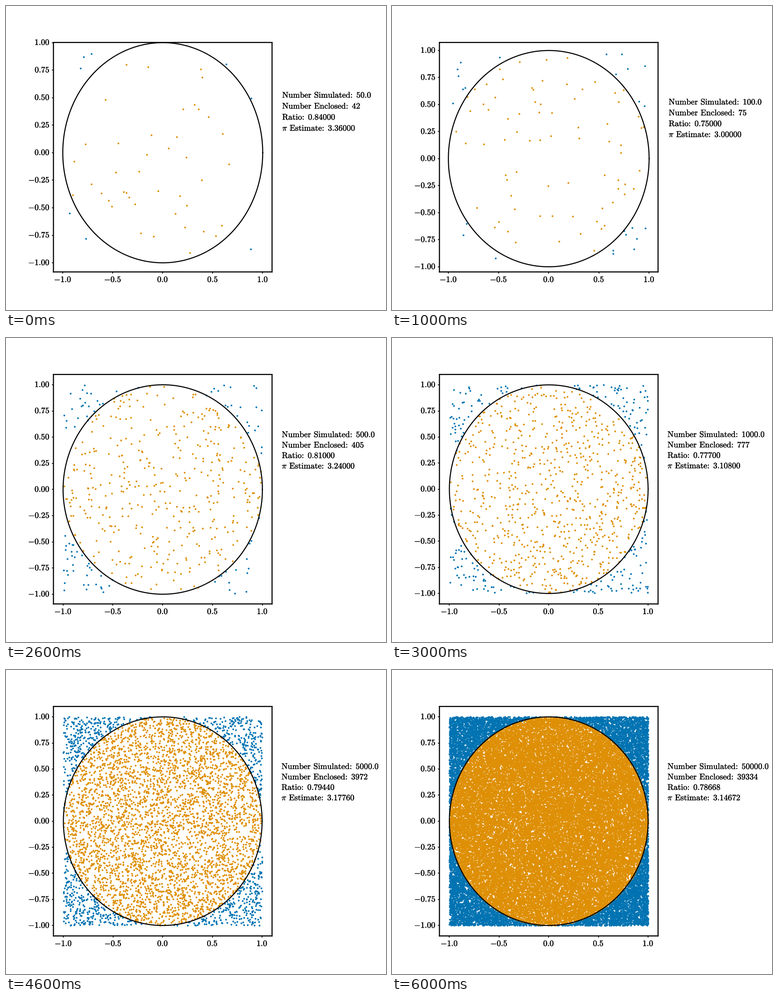
A matplotlib script that plays this animation: 837x669 px, repeating every 7000 ms.

```python
import numpy as np
import matplotlib
import matplotlib.pyplot as plt
from matplotlib import patheffects
from matplotlib.animation import FuncAnimation

matplotlib.rcParams["mathtext.fontset"] = "cm"

W, H, DPI = 837, 669, 64
PT = 72 / DPI  # points per pixel
LEFT, RIGHT, TOP, BOTTOM = 104.5, 586.0, 80.2, 585.2
BLUE, ORANGE = "#0173b2", "#de8f05"
MARGIN = 0.05

# simulated, enclosed, half width of the sample, its lowest and highest y
STAGES = [
    (50, 42, 0.994, -0.988, 0.907),
    (100, 75, 0.990, -0.951, 0.978),
    (500, 405, 0.997, -0.993, 0.999),
    (1000, 777, 1, -1, 1),
    (5000, 3972, 1, -1, 1),
    (10000, 7901, 1, -1, 1),
    (50000, 39334, 1, -1, 1),
]


def draw_sample(seed, n, enclosed, half, low, high):
    """Uniform points with a fixed number of them inside the circle."""
    rng = np.random.default_rng(seed)
    pts = rng.uniform((-half, low), (half, high), (3 * n, 2))
    inside = np.hypot(pts[:, 0], pts[:, 1]) < 1
    return pts[inside][:enclosed], pts[~inside][:n - enclosed]


def padded(low, high):
    pad = MARGIN * (high - low)
    return low - pad, high + pad


def roman(text):
    """Upright math text with word spaces; the colon's own padding is undone."""
    text = text.replace(": ", r"\hspace{-0.2}:\hspace{0.31}")
    return r"\mathrm{" + text.replace(" ", r"\hspace{0.38}") + "}"


def tick_labels(values, digits):
    return [f"${roman(f'{v:.{digits}f}')}$" for v in values]


samples = [draw_sample(40 + i, *stage) for i, stage in enumerate(STAGES)]

fig = plt.figure(figsize=(W / DPI, H / DPI), dpi=DPI, facecolor="white")
ax = fig.add_axes([LEFT / W, 1 - BOTTOM / H, (RIGHT - LEFT) / W, (BOTTOM - TOP) / H])
for spine in ax.spines.values():
    spine.set(linewidth=2.4 * PT, snap=False)

# a thin outline gives the letters their weight
ink = dict(size=18.2 * PT,
           path_effects=[patheffects.withStroke(linewidth=0.35 * PT, foreground="black")])
xticks, yticks = np.linspace(-1, 1, 5), np.linspace(-1, 1, 9)
ax.set_xticks(xticks, tick_labels(xticks, 1), **ink)
ax.set_yticks(yticks, tick_labels(yticks, 2), va="center", **ink)
ax.tick_params(length=4 * PT, width=1.6 * PT)
ax.tick_params(axis="x", pad=4.2 * PT)
ax.tick_params(axis="y", pad=4 * PT)

dot = dict(ls="", marker="o", ms=3.9 * PT, mew=0)
outer, = ax.plot([], [], color=BLUE, **dot)
inner, = ax.plot([], [], color=ORANGE, **dot)
angle = np.linspace(0, 2 * np.pi, 400)
ax.plot(np.cos(angle), np.sin(angle), color="black", lw=2.3 * PT, zorder=3)
lines = [ax.text(1.195, 0.5 - 0.1 * i, "", va="baseline", **ink) for i in range(4)]


def update(i):
    n, enclosed, half, low, high = STAGES[i]
    ax.set_xlim(padded(-half, half))
    ax.set_ylim(padded(low, high))
    for artist, pts in zip((inner, outer), samples[i]):
        artist.set_data(pts[:, 0], pts[:, 1])
    ratio = enclosed / n
    texts = [
        roman(f"Number Simulated: {n:.1f}"),
        roman(f"Number Enclosed: {enclosed}"),
        roman(f"Ratio: {ratio:.5f}"),
        r"\pi" + roman(f" Estimate: {4 * ratio:.5f}"),
    ]
    for line, text in zip(lines, texts):
        line.set_text(f"${text}$")
    return [inner, outer, *lines]


anim = FuncAnimation(fig, update, frames=len(STAGES), init_func=lambda: update(0),
                     interval=1000, repeat=True, repeat_delay=0, blit=False)
plt.show()
```
